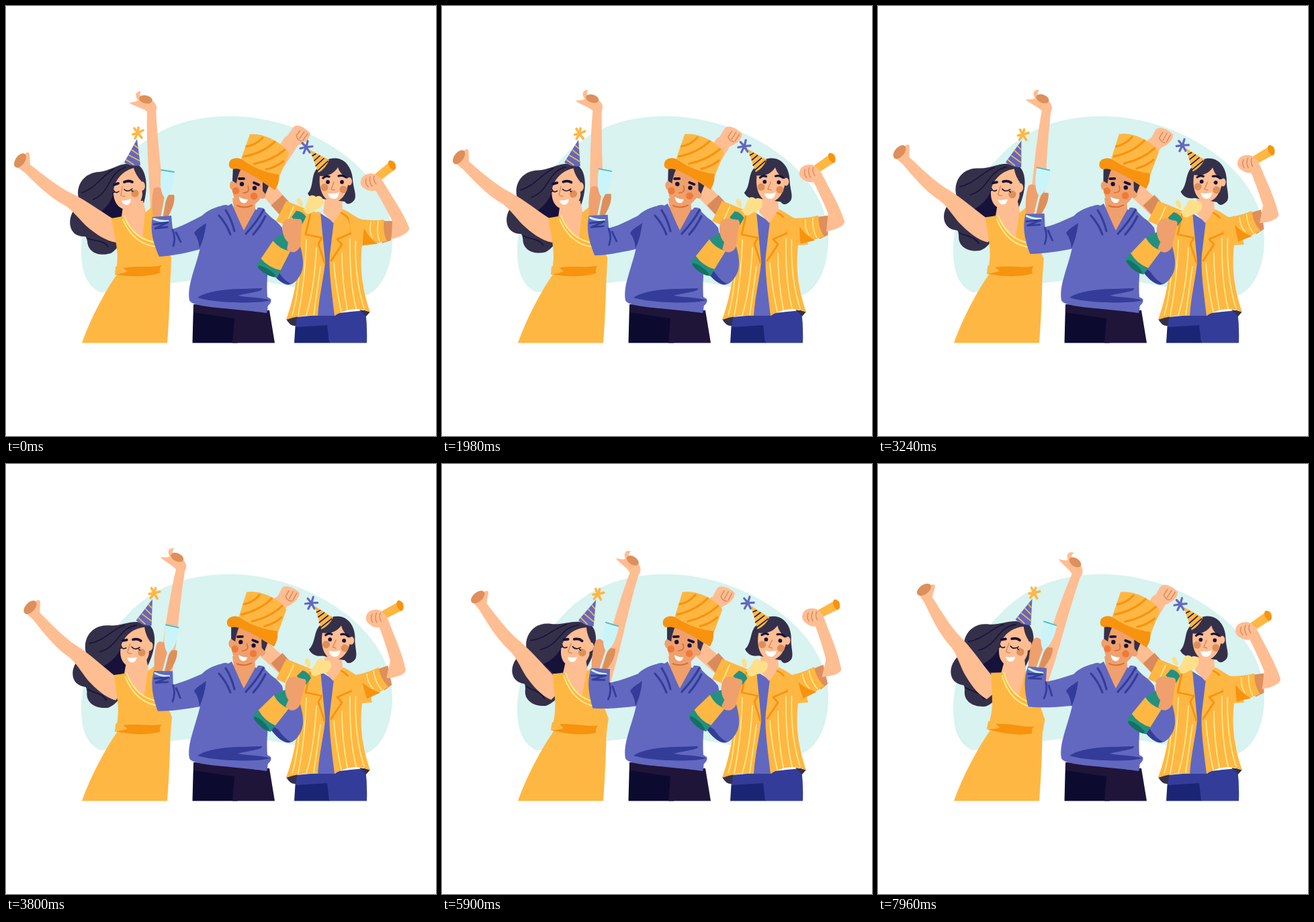
These frames come from a looping animation (640 px wide and 640 px high, 8000 ms). An HTML page:

```html
<!DOCTYPE html>
<html lang="en">
<head>
<meta charset="utf-8">
<title>Party</title>
<style>
html, body { margin: 0; height: 100%; overflow: hidden; background: #fff; }
svg { display: block; width: 100vw; height: 100vh; }
.line { fill: none; stroke-linecap: round; stroke-linejoin: round; }
.skin { fill: #ffbd92; } .tan { fill: #efa06d; } .palm { fill: #de8f5a; }
.hair { fill: #35304a; } .ink { fill: #17123a; }
.gold { fill: #ffb743; } .orange { fill: #f7930f; }
.violet { fill: #6268bf; } .navy { fill: #333d99; }
.teal { fill: #259080; } .foam { fill: #ffe08a; } .white { fill: #fff; }
.inkLine { stroke: #17123a; } .orangeLine { stroke: #f7930f; }
.navyLine { stroke: #333d99; } .paleLine { stroke: #ffec8c; }
.goldLine { stroke: #ffb743; } .palmLine { stroke: #d98b5c; }
</style>
</head>
<body>
<svg viewBox="0 0 640 640">
<path fill="#d8f3f0" d="M112 365C112 300 150 255 190 215C230 178 280 164 332 164C400 164 470 190 520 235C560 272 575 310 575 348C575 385 562 418 538 430C470 435 400 405 330 406C250 406 190 425 140 426C118 415 112 392 112 365Z"/>

<!-- dancer -->
<g id="raisedArm">
  <path class="skin" d="M210 153L223 150C225 200 232 250 235 290L238 335L215 335C217 290 208 220 210 153Z"/>
  <path class="skin" d="M183 144C190 143 195 142 197 140C190 133 194 126 201 127C198 133 200 136 204 136L218 141C226 147 225 154 222 158L211 158C205 152 195 151 183 144Z"/>
  <ellipse class="palm" cx="208" cy="139" rx="10" ry="6" transform="rotate(13 208 139)"/>
</g>
<g class="dancerHead">
  <path class="hair" d="M178 235C164 237 152 246 138 247C110 249 101 276 111 294C88 309 90 345 118 343C120 345 120 347 121 350C122 368 140 373 156 368C175 357 178 330 176 305L203 300C212 275 211 245 196 236Z"/>
  <path class="ink" d="M162 265C162 285 150 300 139 308L160 320L182 305Z"/>
  <g class="line inkLine" stroke-width="1.6">
    <path d="M178 240C150 250 158 275 130 288"/>
    <path d="M160 243C140 255 135 270 113 278"/>
    <path d="M112 300C106 318 125 327 145 332"/>
    <path d="M122 346C130 350 145 348 152 358"/>
  </g>
</g>
<g id="swingArm">
  <path class="skin" d="M27 222C31 216 35 217 35 221L36 236C60 255 80 271 100 280C120 290 140 305 160 317L174 335L164 352C148 350 132 338 119 327C108 316 98 303 88 297C65 285 45 265 28 248L17 240Z"/>
  <ellipse class="palm" cx="21" cy="230" rx="7" ry="12" transform="rotate(35 21 230)"/>
</g>
<path class="gold" d="M166 398C148 424 127 462 113 501.5L240 501.5C243 460 244 430 245 390Z"/>
<g id="torso">
  <path class="skin" d="M175 290L204 290L209 310L204 349L172 314Z"/>
  <path class="gold" d="M157 316L174 313Q186 336 203 347L207 308L217 299L224 330L246 374L245 402L166 402L165 385C168 365 162 345 157 316Z"/>
  <path class="gold" d="M163 388L174 383L176 402L162 400Z"/>
  <path class="orange" d="M174 390C195 386 215 390 232 386Q227 391 230 397C210 404 185 403 164 400Q177 397 181 395Z"/>
  <g class="line paleLine" stroke-width="2">
    <path d="M176 313C185 335 200 349 224 352"/>
    <path d="M174 318C186 345 205 357 224 358"/>
  </g>
</g>
<g class="dancerHead">
  <ellipse class="skin" cx="202" cy="268" rx="5" ry="7"/>
  <path class="skin" d="M190 241C172 246 162 260 160 274C159 292 168 303 181 303C194 303 202 292 203 280L201 260C196 255 192 248 190 241Z"/>
  <circle class="palm" cx="192" cy="279" r="5.7"/>
  <g class="line inkLine">
    <path stroke-width="3.8" d="M161 266L167 264M176 262Q183 259 188 262"/>
    <path stroke-width="1.6" d="M160 274Q163 280 168 276M176 273Q181 278 188 272M161 277l-2 1M187 275l2 1"/>
  </g>
  <path class="line palmLine" stroke-width="1.5" d="M173 269L171 282Q174 284 177 283"/>
  <path class="white" d="M172 290Q179 290 186 287Q186 295 180 296Q174 296 172 290Z"/>
  <path class="violet" d="M195 198L176 233Q187 240 200 237Z"/>
  <path class="line goldLine" stroke-width="1.8" d="M191 207L196 211M187 214L197 221M183 222L198 230M179 229L190 236"/>
  <path class="line goldLine" stroke-width="3.6" d="M196 189l1-8M196 189l8-4M196 189l6 7M196 189l-4 8M196 189l-7 2M196 189l-5-7"/>
</g>

<!-- friend with horn -->
<path class="line" id="backArm" stroke="#ffbd92" stroke-width="23"/>
<path class="line palmLine" stroke-width="23" style="stroke-linecap:butt" d="M403 289L424 312"/>
<g id="backFist">
  <path class="skin" d="M410 206L428 180C434 174 448 183 453 190C452 200 440 207 428 209Z"/>
  <path class="line palmLine" stroke-width="1.5" d="M432 193L438 185M437 197L444 187M442 200L449 190M432 193Q434 200 440 201"/>
</g>
<path fill="#1a2575" d="M431 470L480 468L482 501.5L429 501.5Z"/>
<path class="navy" d="M432 463L535 453Q538 478 537 501.5L481 501.5L478 475L431 478Z"/>
<path class="hair" d="M417 466Q423 477 431 476L434 460ZM526 452L542 455L536 462Z"/>
<path class="violet" d="M464 306L489 322L491 461L463 461Z"/>
<path class="gold" d="M417 290L402 320L436 335C438 380 432 425 417 467Q440 459 464 461C466 430 474 400 475 380L468 307Q455 307 449 303Z"/>
<path class="gold" d="M497 301C512 305 520 317 535 319L545 355L530 356C526 390 530 420 542 456Q518 444 489 461C484 420 480 390 482 370L488 320Z"/>
<path class="skin" d="M475 283L500 286L501 304L487 323L472 307Z"/>
<path class="line paleLine" stroke-width="1.7" d="M447 348Q445 410 435 460M437 385Q435 430 426 460M462 360Q459 420 447 460M468 388L458 460M428 299L417 324M500 368Q500 410 508 452M488 382Q491 420 499 455M512 346Q511 410 521 450M521 335Q517 400 533 450"/>
<path class="line orangeLine" stroke-width="2.8" d="M453 309L446 340L470 345L465 354L474 382M499 308C510 312 515 325 514 338L493 347L500 355L484 379"/>
<g id="hornArm">
  <path class="palm" d="M556 320L577 320L573 349L560 353Z"/>
  <g id="forearm">
    <path class="skin" d="M545 271L561 261C572 280 592 308 600 330C601 336 590 343 574 347L575 320C565 300 556 284 549 273Z"/>
    <path class="gold" d="M547 252L572 231C578 228 583 237 578 244L554 262Z"/>
    <ellipse class="orange" cx="574.5" cy="237" rx="4.5" ry="8" transform="rotate(-32 574.5 237)"/>
    <path class="skin" d="M528 261C528 252 541 247 548 250C556 253 564 262 561 267C555 275 545 278 536 273C531 271 527 267 528 261Z"/>
    <path class="line palmLine" stroke-width="1.4" d="M536 257Q534 264 539 269M542 254Q540 262 545 268M548 253Q546 259 551 265"/>
  </g>
  <path class="gold" d="M510 314Q540 321 563 318Q560 336 567 350L530 357L515 345Z"/>
  <path class="orange" d="M533 331Q531 346 531 356L553 354Q540 345 533 331Z"/>
  <path class="line paleLine" stroke-width="1.6" d="M543 322Q540 335 545 345M554 321Q551 338 556 350"/>
</g>
<g id="friendHead">
  <path class="hair" d="M478 229C500 220 515 238 516 258C517 272 522 280 519 288C514 295 508 297 504 291L470 287C460 290 452 285 449 279C458 270 454 252 462 243Z"/>
  <ellipse class="skin" cx="511" cy="261" rx="4" ry="6"/>
  <path class="skin" d="M467 253C465 274 473 290 487 292C502 291 509 275 510 258C503 254 497 249 494 240C488 250 478 254 467 253Z"/>
  <circle class="palm" cx="474" cy="270" r="5.5"/><circle class="palm" cx="502" cy="273" r="5.5"/>
  <circle class="ink" cx="479" cy="262" r="2.9"/><circle class="ink" cx="500" cy="262" r="2.9"/>
  <path class="line inkLine" stroke-width="3.2" d="M472 256Q476 252 481 254M495 253Q501 251 506 255"/>
  <path class="line palmLine" stroke-width="1.5" d="M488 262L484 273L489 274"/>
  <path class="white" d="M479 279Q488 280 496 277Q495 287 488 287Q481 287 479 279Z"/>
  <path class="gold" d="M452 214L465 248Q476 242 481 229Z"/>
  <path class="line inkLine" stroke-width="1.6" d="M456 223L461 220M459 230L467 223M461 238L473 227M464 245L479 231"/>
  <path class="line" stroke="#6268bf" stroke-width="3.2" d="M447 210l2-9M447 210l9-1M447 210l5 8M447 210l-4 9M447 210l-9 2M447 210l-6-6"/>
</g>

<!-- host -->
<g id="toastArm">
  <path class="tan" d="M220 272C225 267 232 270 236 280L238 291L241 281L250 281C252 292 247 303 240 316L219 316C217 300 216 285 220 272Z"/>
  <path class="palm" d="M238 290L242 281L250 281C252 292 247 303 240 315L235 312Z"/>
  <path fill="#c9f5fa" d="M231 244L251 247C250 264 246 280 237 287C229 278 229 260 231 244Z"/>
  <path class="line" stroke="#c9f5fa" stroke-width="2.8" d="M237 286L231 318"/>
  <path class="line" stroke="#4cb9cb" stroke-width="1.8" d="M231 244L250 247"/>
  <path class="violet" d="M316 301C295 308 272 325 248 332L246 312L218 314C214 335 219 352 228 373C250 372 275 366 305 358Z"/>
  <path class="line" stroke="#c9f5fa" stroke-width="3" d="M220 317Q230 321 241 320"/>
  <path class="line navyLine" stroke-width="2.8" d="M220 325L241 322L222 331L240 329M248 333Q253 345 249 357M253 337L260 351"/>
</g>
<path fill="#0d0a30" d="M279 444L345 450L345 501.5L277.500 501.5Z"/>
<path fill="#1f1539" d="M279 444L392 453L400 501.5L337 501.5L340 465L279 456Z"/>
<path class="violet" d="M395 325L412 346L438 358C442 372 444 385 440 396C434 410 424 419 414 413C404 407 398 400 392 393Z"/>
<path class="navy" d="M394 388L405 395Q415 410 424 413Q412 419 394 395Z"/>
<path class="violet" d="M318 298C305 302 298 306 292 312L289 360C283 388 269 416 273 438C277 449 330 449 388 457C390 451 389 448 390 446Q396 441 394 436L389 433C387 400 392 375 395 366L414 346L411 330C405 322 395 312 372 303Z"/>
<path class="navy" d="M298 323C290 329 283 332 280 338Q287 347 288 361Q296 343 298 323Z"/>
<path class="navy" d="M285 434C300 424 330 421 352 421L381 420C383 425 365 426 345 431C360 434 378 433 394 438C370 444 310 442 285 434Z"/>
<path class="tan" d="M337 286L370 288L371 303L354 334L340 309Z"/>
<path class="violet" d="M317 299Q325 294 331 297L336 294L354 335L375 300Q386 299 386 306L398 318L360 352L340 345Z"/>
<path class="line navyLine" stroke-width="3.2" d="M327 304Q336 318 340 335M317 312Q328 324 334 340M383 304Q373 322 357 339M386 313Q378 329 368 340"/>
<g id="hostHead">
  <ellipse class="tan" cx="338" cy="267" rx="5" ry="7"/><ellipse class="tan" cx="382" cy="281" rx="5" ry="6"/>
  <path class="tan" d="M345 236C339 255 336 270 338 280C340 293 348 300 357 300C370 299 381 288 385 272L388 258Z"/>
  <path class="hair" d="M338 238L352 238Q345 250 343 264L337 260ZM382 262L391 268L386 280L382 275Z"/>
  <path class="line" stroke="#d96f30" stroke-width="2" d="M344 297Q354 302 366 297"/>
  <circle fill="#f0793a" cx="342" cy="275" r="5.3"/><circle fill="#f0793a" cx="369" cy="283" r="5.3"/>
  <circle class="ink" cx="351" cy="265" r="3.2"/><circle class="ink" cx="370" cy="271" r="3.2"/>
  <path class="line inkLine" stroke-width="3.8" d="M347 257L354 257M369 263L376 266"/>
  <path class="line" stroke="#d96f30" stroke-width="1.6" d="M360 268Q364 278 353 278"/>
  <path class="white" d="M347 284Q353 288 360 288Q358 295 352 293Q347 291 347 284Z"/>
  <path class="gold" d="M363 191C385 188 415 206 421 220L406 256C385 252 364 243 349 230Z"/>
  <path class="line orangeLine" stroke-width="3.2" d="M358 209Q372 207 382 196M354 224Q382 219 400 202M369 235Q396 230 415 214M387 243Q402 240 413 231"/>
  <path class="orange" d="M336 228Q345 224 352 229Q375 246 406 251Q408 263 400 274C386 264 358 244 342 242Q334 244 332 238Q331 231 336 228Z"/>
</g>
<g id="bottleArm">
  <g transform="translate(388 395) rotate(30.5)">
    <path class="teal" d="M-18 0L-15-44Q-13-53-8-60L-6-98L8-98L9-60Q13-53 15-44L18 0Q0 8-18 0Z"/>
    <path class="gold" d="M-17-12L-15-44Q0-38 15-44L17-12Q0-6-17-12Z"/>
    <ellipse cx="0" cy="0" rx="15" ry="4" fill="#147064"/>
    <path class="teal" d="M-9-88L-8-100Q0-104 9-100L10-88Z"/>
  </g>
  <path class="tan" d="M413 321C420 313 430 318 438 317Q442 320 440 326L438 358C432 369 424 368 418 362L420 352C412 345 409 330 413 321Z"/>
  <path class="foam" d="M447 309C440 301 449 296 449 288C452 280 458 281 461 284C468 280 474 286 472 294C469 303 459 303 456 307Q451 311 447 309Z"/>
  <path class="foam" d="M432 289Q434 284 438 287Q443 293 441 299Q434 297 432 289ZM441 303l8-4 2 9z"/>
</g>
</svg>
<script>
const $ = id => document.getElementById(id);
const heads = document.querySelectorAll('.dancerHead');
const turn = (id, angle, x, y) => $(id).setAttribute('transform', `rotate(${angle} ${x} ${y})`);
const wave = (t, half) => (1 - Math.cos(Math.PI * t / half)) / 2;

function draw(now) {
  const t = now % 8000;
  const slow = wave(t, 10000), fast = wave(t, 5000);

  turn('raisedArm', 22 * slow + 5.7 * fast, 232, 364);
  turn('torso', 8.7 * slow, 200, 395);
  $('swingArm').setAttribute('transform', `translate(${7.8 * slow} 0) rotate(${21.9 * slow} 165 325)`);
  heads.forEach(h => h.setAttribute('transform',
    `translate(${18.9 * slow + 2.8 * fast} ${-2 * slow}) rotate(${8.7 * slow + 7.5 * fast} 179 290)`));

  turn('toastArm', 9.6 * slow + 1.3 * fast, 300, 340);
  turn('hostHead', -2.8 * fast, 350, 305);
  turn('bottleArm', 13.5 * fast, 425, 353);

  turn('friendHead', 5.5 * fast, 490, 300);
  turn('hornArm', -22.7 * fast, 515, 335);
  turn('forearm', 34.7 * fast, 590, 332);
  $('backFist').setAttribute('transform', `translate(${-18 * fast} ${5 * fast}) rotate(${-8 * fast} 430 195)`);
  $('backArm').setAttribute('d',
    `M${423 - 18 * fast} ${204 + 5 * fast}L${383 - 9 * fast} ${266 + 2 * fast}L425 313`);
  requestAnimationFrame(draw);
}
draw(0);
</script>
</body>
</html>
```
